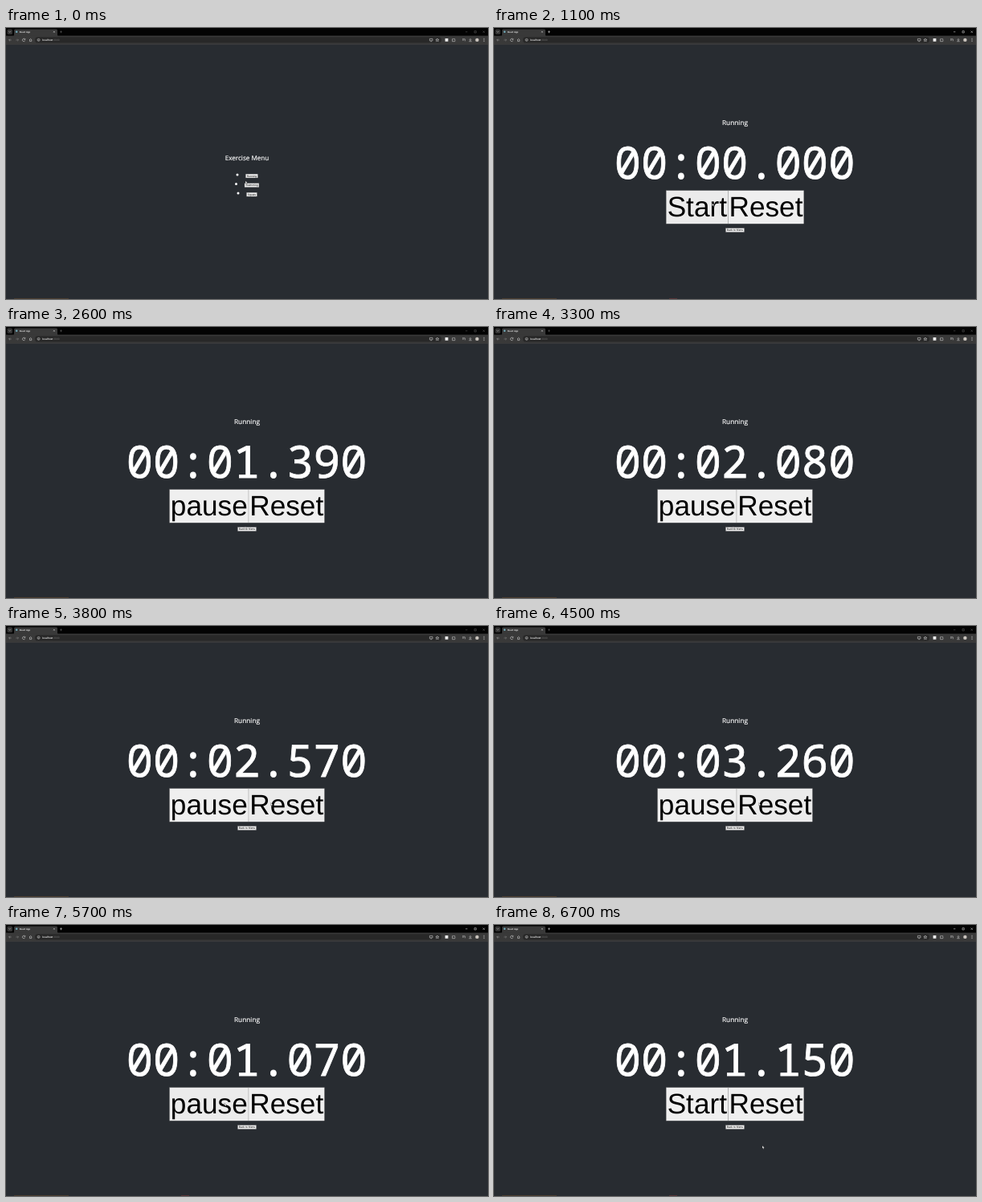
Animation, 600 px wide and 338 px high, one loop 7.2 s. Source, as an HTML page:

```html
<!DOCTYPE html>
<html lang="en">
<head>
<meta charset="utf-8">
<title>React App</title>
<style>
  html, body { margin: 0; width: 100%; height: 100%; overflow: hidden; background: #282c31; }
  svg { display: block; width: 100vw; height: 100vh; }
  text { font-family: "Open Sans", "Noto Sans", sans-serif; fill: #fff; text-rendering: geometricPrecision; white-space: pre; }
  .mid { text-anchor: middle; stroke: #fff; stroke-width: .15; }
  .btn rect { fill: #efefef; stroke: #777; stroke-width: .25; }
  .btn.hover rect { fill: #ebebeb; }
  .btn text { font-family: "Liberation Sans", Arial, sans-serif; fill: #000; text-anchor: middle; }
  .line { fill: none; stroke: #ccc; stroke-width: .6; }
  #clock { font: 55.5px "Noto Sans Mono", monospace; stroke-width: .8; }
</style>
</head>
<body>
<svg viewBox="0 0 600 338" id="stage">
  <rect width="600" height="338" fill="#282c31"/>

  <!-- browser bar -->
  <rect width="600" height="10" fill="#030303"/>
  <rect x="1.5" y="1.5" width="6.5" height="6.5" rx="1.6" fill="#343434"/>
  <path d="M9 10Q10 10 10 8.5V3Q10 1.5 11.5 1.5H62.5Q64 1.5 64 3V8.5Q64 10 65 10Z" fill="#393939"/>
  <rect y="9.6" width="600" height="10.6" fill="#393939"/>
  <rect x="36" y="11.3" width="506" height="7.2" rx="3.6" fill="#282828"/>
  <rect y="20" width="600" height=".5" fill="#444"/>
  <circle cx="13.2" cy="4.8" r="1.3" fill="#6fa9b8"/>
  <text x="16.8" y="5.8" font-size="2.75" font-weight="600">React App</text>
  <text x="45" y="16.1" font-size="3.1" font-weight="600">localhost<tspan fill="#777" font-weight="400">:3000</tspan></text>
  <path class="line" d="M3.5 4.2l1.2 1.2 1.2-1.2M59 3.9l1.8 1.8m0-1.8l-1.8 1.8"/>
  <path class="line" stroke-opacity=".6" d="M6.7 15H3.6m1.4-1.4L3.6 15 5 16.4"/>
  <path class="line" stroke-opacity=".45" d="M12.4 15h3.1m-1.4-1.4l1.4 1.4-1.4 1.4"/>
  <path class="line" d="M23.6 14.2a1.7 1.7 0 1 0 .1 1.4M23.8 13v1.4h-1.4M29 15l1.6-1.5 1.6 1.5m-2.7-.4v2h2.2v-2"/>
  <circle class="line" cx="40.6" cy="14.9" r="1.5"/>
  <path class="line" d="M40.6 14.6v1.2M527.4 13.4h3.6v2.5h-3.6zm1 3.3h1.6"/>
  <path class="line" d="M536.9 13l.6 1.3 1.4.1-1.1.9.4 1.4-1.3-.8-1.3.8.4-1.4-1.1-.9 1.4-.1z"/>
  <rect x="546.6" y="13" width="3.8" height="3.8" fill="#eee"/>
  <path class="line" d="M555.6 13.7h1.2q.5-1 1 0h1v1q.9.5 0 1v1h-3.2z"/>
  <path class="line" d="M568 13.8h3.5m-3.5 1.3h2m1.4-1v2.2M578 13v2.5m-1.2-1.1l1.2 1.2 1.2-1.2m-2.9 2.3h3.4"/>
  <circle cx="586.4" cy="14.9" r="2.2" fill="#c9c3bd"/>
  <path d="M595 13.2v.1m0 1.6v.1m0 1.6v.1" stroke="#ddd" stroke-width=".9" stroke-linecap="round"/>
  <path id="controls" class="line" d="M67 4.8h3m-1.5-1.5v3M572 4.8h2.4M583 3.7h2.3v2.3h-2.3zM593.6 3.6l2.3 2.3m0-2.3l-2.3 2.3"/>

  <!-- sliver of the task bar -->
  <rect x="10" y="337.3" width="68" height=".7" fill="#5a4630"/>
  <rect id="task" x="218" y="337.3" width="10" height=".7" fill="#6a3838"/>

  <g id="menu">
    <text class="mid" x="300" y="165.3" font-size="8.15">Exercise Menu</text>
    <g fill="#fff">
      <circle cx="288" cy="183" r="1.5"/>
      <circle cx="286.5" cy="194.6" r="1.5"/>
      <circle cx="289" cy="206" r="1.5"/>
    </g>
  </g>
  <g id="timer">
    <text class="mid" x="300" y="120.7" font-size="8.25">Running</text>
    <text class="mid" id="clock" x="299.6" y="188">00:00.000</text>
    <g id="idle"></g>
    <g id="active"></g>
  </g>
  <path id="cursor" d="M0 0v3.5l.85-.75.65 1.35.65-.3-.6-1.3h1.1z" fill="#fff" stroke="#222" stroke-width=".3"/>
</svg>
<script>
const $ = id => document.getElementById(id);
const LOOP = 7200, SMALL = 3.35, LARGE = 35.2;
const buttons = [];

function el(name, attrs, parent) {
  const node = document.createElementNS("http://www.w3.org/2000/svg", name);
  for (const key in attrs) node.setAttribute(key, attrs[key]);
  return parent.appendChild(node);
}

function button(group, label, x, y, w, size) {
  const h = size * 1.149 + 1;
  const node = el("g", { class: "btn" }, $(group));
  el("rect", { x, y, width: w, height: h }, node);
  el("text", { x: x + w / 2, y: y + .5 + size * .905, "font-size": size }, node).textContent = label;
  buttons.push({ node, group, x, y, w, h });
}

button("menu", "Running", 298.4, 182.1, 15, SMALL);
button("menu", "Swimming", 297, 193.7, 17.9, SMALL);
button("menu", "Squats", 299.5, 205.2, 12.9, SMALL);
button("timer", "Back to Menu", 288.5, 249.7, 23, SMALL);
button("idle", "Start", 214.3, 202.7, 77, LARGE);
button("idle", "Reset", 291.3, 202.7, 94.4, LARGE);
button("active", "pause", 203.6, 202.7, 98.4, LARGE);
button("active", "Reset", 302, 202.7, 94.4, LARGE);

// pointer path: time, x, y
const path = [
  [0, 298, 190.7], [300, 306, 184], [600, 306, 184], [1000, 271.5, 218.5], [1400, 271.5, 218.5],
  [1800, 297.5, 248.8], [3300, 297.5, 248.8], [3700, 329.5, 220.5], [4800, 329.5, 220.5],
  [5200, 301.8, 222], [5600, 272, 222], [6200, 272, 222], [6700, 334, 275.3], [LOOP, 334, 275.3]
];

function pointer(t) {
  const i = path.findIndex(p => p[0] > t);
  const a = path[i - 1], b = path[i];
  const k = (t - a[0]) / (b[0] - a[0]);
  return [a[1] + (b[1] - a[1]) * k, a[2] + (b[2] - a[2]) * k];
}

function tick(t) {
  const hold = [0, 300, 2700, 3000, 6000].find(h => t >= h && t < h + 300);
  return hold ?? Math.floor(t / 100) * 100;
}

function elapsed(t) {
  if (t < 1200) return 0;
  const ms = t < 4700 ? 700 + (t - 1900) * .984 : Math.min(1150, 580 + (t - 5200) * .984);
  return Math.round(ms / 10) * 10;
}

function format(ms) {
  const pad = (n, len) => String(n).padStart(len, "0");
  return `${pad(Math.floor(ms / 60000), 2)}:${pad(Math.floor(ms / 1000) % 60, 2)}.${pad(ms % 1000, 3)}`;
}

function show(id, on) {
  $(id).style.display = on ? "" : "none";
}

function draw(now) {
  const t = tick(now % LOOP);
  const inMenu = t < 600, running = t >= 1200 && t < 5800;
  const focused = (t >= 600 && t < 2400) || t >= 4600;
  const visible = { menu: inMenu, timer: !inMenu, idle: !inMenu && !running, active: running };
  for (const id in visible) show(id, visible[id]);
  show("task", focused);
  $("controls").style.opacity = focused ? 1 : .4;
  $("clock").textContent = format(elapsed(t));

  const [x, y] = pointer(t);
  $("cursor").setAttribute("transform", `translate(${x} ${y})`);
  for (const b of buttons) {
    const over = visible[b.group] && x >= b.x && x < b.x + b.w && y >= b.y && y < b.y + b.h;
    b.node.classList.toggle("hover", over);
  }
}

const start = performance.now();
function frame() {
  draw(performance.now() - start);
  requestAnimationFrame(frame);
}
frame();
</script>
</body>
</html>
```
